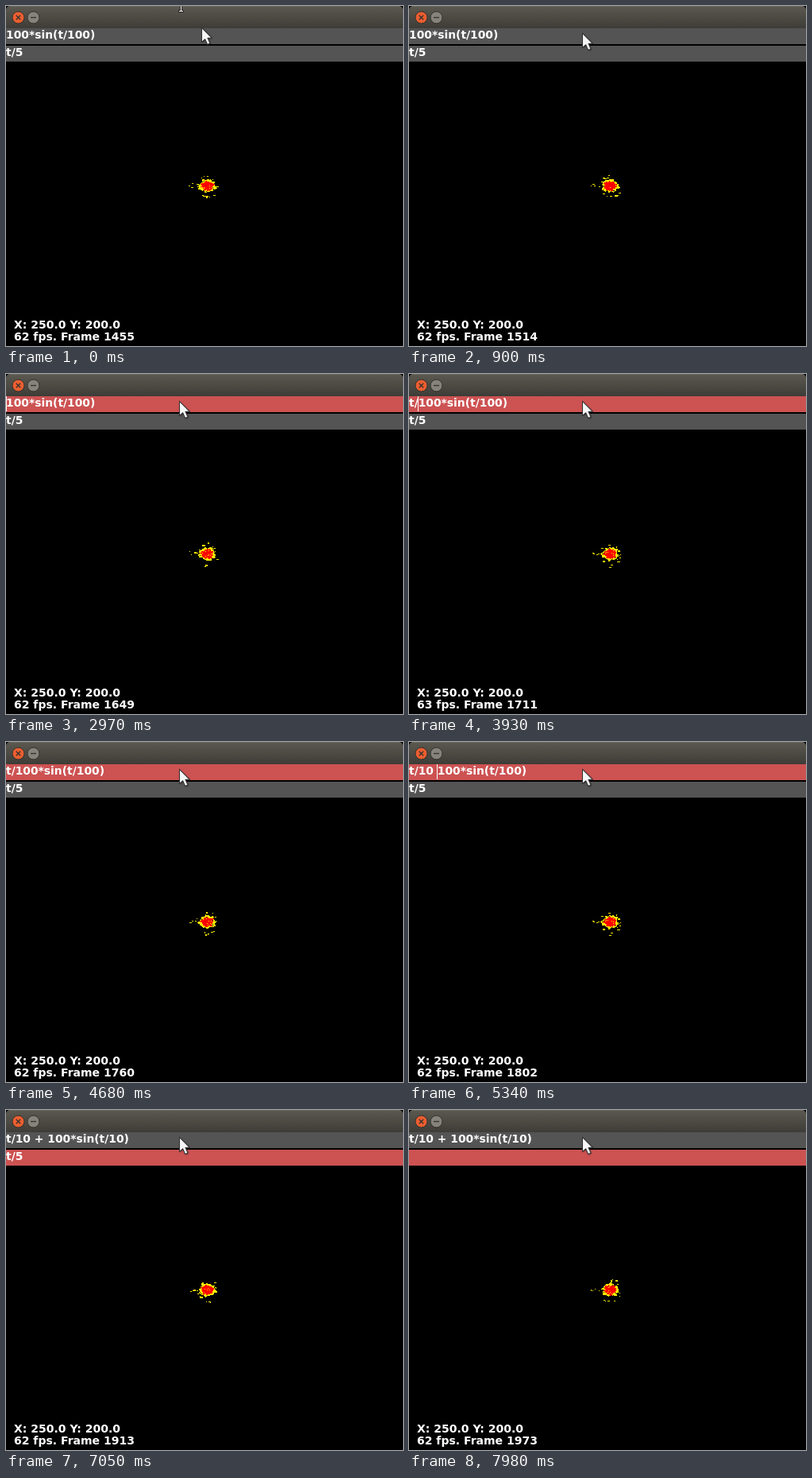
These frames come from a looping animation (500x428 px, 8 s). An HTML page with a canvas:

```html
<!DOCTYPE html>
<html lang="en">
<head>
<meta charset="utf-8">
<title>Formula plotter</title>
<style>
html, body { margin: 0; width: 100%; height: 100%; overflow: hidden; background: #000; }
canvas { display: block; }
</style>
</head>
<body>
<canvas id="stage" width="500" height="428"></canvas>
<script>
const ctx = document.getElementById("stage").getContext("2d");
const LOOP = 8000, STEP = 30, TAU = Math.PI * 2;
const FAMILY = '"DejaVu Sans", Verdana, sans-serif';
const GREY = "#545454", RED = "#cd5252";
const FLAME = "#f00", SPARK = "#ffee00";

const clamp = (v, lo, hi) => Math.min(hi, Math.max(lo, v));

// Number of keys pressed by time t in an evenly paced run.
const presses = (t, start, gap, max) => clamp(Math.floor((t - start) / gap) + 1, 0, max);

function random(seed) {
  let s = seed * 7919 + 17;
  return () => {
    s = (s + 0x6D2B79F5) | 0;
    let v = Math.imul(s ^ (s >>> 15), 1 | s);
    v = (v + Math.imul(v ^ (v >>> 7), 61 | v)) ^ v;
    return ((v ^ (v >>> 14)) >>> 0) / 4294967296;
  };
}

function rect(x, y, w, h, color) {
  ctx.fillStyle = color;
  ctx.fillRect(x, y, w, h);
}

function text(s, x, y, size) {
  ctx.font = `bold ${size}px ${FAMILY}`;
  ctx.fillStyle = "#fff";
  ctx.fillText(s, x, y);
}

// The counter runs slightly faster at the beginning.
function tickCount(t) {
  return Math.round(1455 + 0.0646 * t + 2.2 * Math.min(1, t / 1700));
}

function editor(t) {
  const typed = presses(t, 3450, 270, 2) + presses(t, 4710, 225, 5);
  const tail = t < 6720 ? "100*sin(t/100)" : "100*sin(t/10)";
  const first = "t/10 + ".slice(0, typed) + tail;
  const second = "t/5".slice(0, 3 - presses(t, 7440, 150, 3));
  const row = t < 1260 ? -1 : t < 7050 ? 0 : 1;

  let caret = typed;
  if (t < 2250 || t >= 5940) caret = first.length;
  if (t >= 6540) caret--;
  if (row === 1) caret = second.length;
  return { rows: [first, second], row, caret };
}

function disc(x, fill, drawMark) {
  ctx.beginPath();
  ctx.arc(x, 14.5, 7.5, 0, TAU);
  ctx.fillStyle = fill;
  ctx.fill();
  ctx.strokeStyle = "#33312c";
  ctx.lineWidth = 1;
  ctx.stroke();
  ctx.beginPath();
  drawMark(x, 14.5);
  ctx.lineWidth = 1.3;
  ctx.stroke();
}

function line(x0, y0, x1, y1) {
  ctx.moveTo(x0, y0);
  ctx.lineTo(x1, y1);
}

function titleBar() {
  const g = ctx.createLinearGradient(0, 0, 0, 28);
  g.addColorStop(0, "#5b5950");
  g.addColorStop(1, "#3d3c37");
  ctx.fillStyle = g;
  ctx.beginPath();
  ctx.roundRect(0, 0, 500, 28, [5, 5, 0, 0]);
  ctx.fill();
  rect(4, 0, 492, 1, "#68665d");
  disc(15.5, "#eb5e30", (x, y) => {
    line(x - 2.7, y - 2.7, x + 2.7, y + 2.7);
    line(x - 2.7, y + 2.7, x + 2.7, y - 2.7);
  });
  disc(34.5, "#85837a", (x, y) => line(x - 3.5, y, x + 3.5, y));
}

function entry(y, s, selected, caretOn, caret) {
  rect(0, y, 500, 20, selected ? RED : GREY);
  text(s, 0, y + 13, 13.86);
  if (selected && caretOn) {
    rect(Math.floor(ctx.measureText(s.slice(0, caret)).width), y, 1, 19, "#fff");
  }
}

// A red core in a ragged yellow rim, with stray sparks around it.
function fire(phase) {
  const rnd = random(phase + 3);
  const waves = [3, 5, 8, 13].map(n => ({ n, shift: rnd() * TAU }));
  const ragged = a => waves.reduce((sum, w) => sum + Math.sin(w.n * a + w.shift), 0);

  for (let y = 215; y < 238; y++) {
    for (let x = 238; x < 268; x++) {
      const u = (x - 253) / 11, v = (y - 226) / 8.5;
      const r = Math.hypot(u, v), a = Math.atan2(v, u);
      const rim = 0.95 + 0.06 * ragged(a), core = 0.7 + 0.05 * ragged(-a);
      if (r < core) rect(x, y, 1, 1, rnd() < 0.05 ? SPARK : FLAME);
      else if (r < rim && rnd() < 0.94) rect(x, y, 1, 1, SPARK);
    }
  }

  for (let i = 0; i < 16; i++) {
    const a = rnd() * TAU, r = 0.8 + rnd() * 0.25;
    const w = 1 + Math.floor(rnd() * 3.5), h = rnd() < 0.2 ? 2 : 1;
    const left = i % 4 === 0;
    const x = left ? 228 + rnd() * 12 : 253 + 13 * r * Math.cos(a);
    const y = left ? 223 + rnd() * 5 : 227 + 15 * r * Math.sin(a);
    rect(Math.round(x), Math.round(y), w, h, SPARK);
  }
}

function pointer(t) {
  const k = Math.min(1, t / 600), e = k * k * (3 - 2 * k);
  ctx.save();
  ctx.translate(246.5 - 28 * e, 27.5 + 7 * e);
  ctx.scale(1.05, 1.05);
  ctx.beginPath();
  for (const [x, y] of [[0, 0], [0, 17], [4, 13.6], [6.8, 20], [10, 18.6], [7.2, 12.4], [12, 12]]) {
    ctx.lineTo(x, y);
  }
  ctx.closePath();
  ctx.shadowColor = "rgba(0,0,0,.5)";
  ctx.shadowBlur = 2;
  ctx.shadowOffsetX = ctx.shadowOffsetY = 1;
  ctx.fillStyle = "#f6f6f6";
  ctx.fill();
  ctx.shadowColor = "transparent";
  ctx.strokeStyle = "#333";
  ctx.lineWidth = 1;
  ctx.stroke();
  ctx.restore();
}

function beam() {
  rect(219, 0, 3, 6, "#2a2a28");
  rect(217, 5, 7, 3, "#2a2a28");
  rect(220, 0, 1, 6, "#fff");
  rect(218, 6, 5, 1, "#fff");
}

function draw(t) {
  rect(0, 0, 500, 428, "#000");
  titleBar();
  const { rows, row, caret } = editor(t);
  const blink = t % 1200 < 600;
  rows.forEach((s, i) => entry(28 + 22 * i, s, row === i, blink, caret));

  const ticks = tickCount(t);
  const turn = (ticks - 1711) / 8.275 + 0.04;
  fire(Math.floor((turn - Math.floor(turn)) * 12));

  const fps = t >= 3600 && t < 4300 ? 63 : 62;
  text("X: 250.0 Y: 200.0", 10, 406, 14);
  text(`${fps} fps. Frame ${ticks}`, 10, 421, 14);
  if (t < 150) beam();
  pointer(t);
}

const start = performance.now();
function tick() {
  const t = (performance.now() - start) % LOOP;
  draw(Math.floor(t / STEP) * STEP);
  requestAnimationFrame(tick);
}
tick();
</script>
</body>
</html>
```
